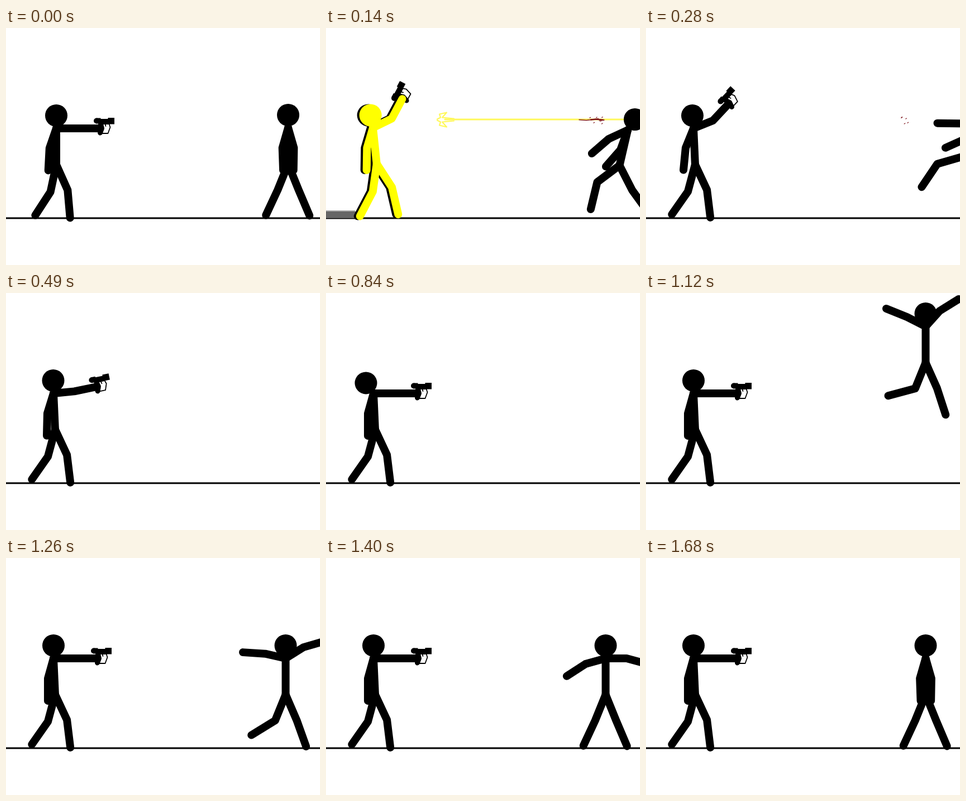
These frames come from a looping animation (562x425 px, 1.75 s). An HTML page with a canvas:

```html
<!DOCTYPE html>
<html lang="en">
<head>
<meta charset="utf-8">
<title>Stick duel</title>
<style>
  html, body { margin: 0; width: 100%; height: 100%; overflow: hidden; background: #fff; }
  canvas { display: block; }
</style>
</head>
<body>
<canvas id="stage" width="562" height="425"></canvas>
<script>
const ctx = document.getElementById('stage').getContext('2d');
const STEP = 70, STEPS = 25, FLOOR = 341;
const BLACK = '#000', YELLOW = '#ff0', BEAM = '#fff85a', BLOOD = '#7c1219';
const HEAD = 20, LIMB = 14, NECK = 23, SPINE = 65, ARM = [37.5, 40], LEG = [50, 50];

// A pose is the shoulder position plus bone angles in degrees: 0 hangs down, 90 points right.
const aim = { at: [85, 180], neck: [180], spine: [2.6],
  armL: [-15.5, 0], armR: [90, 90], legL: [-15, -35], legR: [25, 7] };
const ready = { ...aim, at: [90, 180], spine: [0], armL: [-19, -3], legL: [-12, -33], legR: [24, 5] };
const recoil = { at: [84, 179], neck: [191], spine: [6],
  armL: [-16.5, -1], armR: [116, 152], legL: [-8, -27.5], legR: [33, 13] };
const lower = { ...aim, neck: [185], armL: [-22, -5.6], armR: [112, 137] };
const lookUp = { ...aim, neck: [216] };

const rest = { at: [500.5, 180], neck: [180], spine: [0],
  armL: [-16, 2], armR: [16, -1], legL: [-22, -25], legR: [22, 23] };
const stand = { ...rest, at: [505, 179] };
const hit = { at: [540, 183], neck: [146], spine: [-13],
  armL: [-65, -49], armR: [-20, -41], legL: [-53, -13.5], legR: [27, 36] };
const flung = { at: [599, 172], neck: [140], spine: [-27],
  armL: [-91, -91], armR: [-45, -66], legL: [-74, -34], legR: [30, 40] };
const drop = { ...rest, armL: [-117, -112], armR: [138, 122], legL: [-22, -75], legR: [24, 18] };
const spread = { ...rest, armL: [-74.5, -57], armR: [90, 75] };

const shooterKeys = [[0, ready], [1, ready], [2, recoil], [4, lower], [8, aim],
  [9, aim], [12, lookUp], [16, aim]];
const flightKeys = [[0, stand], [2, hit], [4, flung]];
const fallKeys = [[17, drop], [20, spread], [24, rest]];

function mix(a, b, f) {
  const pose = {};
  for (const part in a) pose[part] = a[part].map((v, i) => v + (b[part][i] - v) * f);
  return pose;
}

function poseAt(keys, n) {
  const next = keys.findIndex(k => k[0] >= n);
  if (next < 0) return keys[keys.length - 1][1];
  if (next === 0) return keys[0][1];
  const [t0, a] = keys[next - 1], [t1, b] = keys[next];
  return mix(a, b, (n - t0) / (t1 - t0));
}

function targetPose(n) {
  const pose = poseAt(n < 7 ? flightKeys : fallKeys, n);
  const [x, y] = pose.at;
  const at = n < 7 ? [x + 70 * Math.max(0, n - 4), y] : [x, Math.min(y, 60 + 94 * (n - 16))];
  return { ...pose, at };
}

function random(seed) {
  return () => (seed = seed * 16807 % 2147483647) / 2147483647;
}

function line(points, color, width) {
  ctx.strokeStyle = color;
  ctx.lineWidth = width;
  ctx.beginPath();
  for (const [x, y] of points) ctx.lineTo(x, y);
  ctx.stroke();
}

function disc(x, y, r, color) {
  ctx.fillStyle = color;
  ctx.beginPath();
  ctx.arc(x, y, r, 0, Math.PI * 2);
  ctx.fill();
}

// Joint positions along bones of the given lengths and angles.
function chain(start, lengths, angles) {
  const points = [start];
  angles.forEach((deg, i) => {
    const [x, y] = points[i], a = deg * Math.PI / 180;
    points.push([x + lengths[i] * Math.sin(a), y + lengths[i] * Math.cos(a)]);
  });
  return points;
}

function figure(pose, color) {
  const [, head] = chain(pose.at, [NECK], pose.neck);
  const spine = chain(pose.at, [SPINE], pose.spine);
  disc(...head, HEAD, color);
  line(spine, color, LIMB);
  for (const arm of [pose.armL, pose.armR]) line(chain(pose.at, ARM, arm), color, LIMB);
  for (const leg of [pose.legL, pose.legR]) line(chain(spine[1], LEG, leg), color, LIMB);
}

function gun(pose) {
  const hand = chain(pose.at, ARM, pose.armR)[2];
  ctx.save();
  ctx.translate(...hand);
  ctx.rotate((90 - pose.armR[1]) * Math.PI / 180);
  disc(-5.5, -13.5, 5, BLACK);
  ctx.fillRect(-6, -18.5, 8, 10);
  ctx.fillRect(-2, -17, 20, 10);
  ctx.fillRect(15, -19, 11.5, 11.5);
  line([[2, -8], [4, 0], [1, 8]], BLACK, 9);
  line([[17, -8], [19, -2], [15, 9], [4, 9]], BLACK, 1.8);
  line([[10, -8], [11, -4]], BLACK, 1.8);
  ctx.restore();
}

function shot(width, size) {
  line([[213, 164], [534, 164]], BEAM, width);
  ctx.save();
  ctx.translate(198, 164.5);
  ctx.scale(size, size);
  const half = [[31, -2], [10, -4], [18, -13], [5, -10], [7, -4], [1, -1]];
  for (const side of [1, -1]) line(half.map(([x, y]) => [x, y * side]), BEAM, 2.2);
  ctx.restore();
}

function blood(n) {
  if (n < 2 || n > 4) return;
  const rnd = random(77), fresh = n === 2;
  if (fresh) {
    line([[453, 164.5], [466, 165.5], [482, 163.5], [498, 165]], BLOOD, 1.4);
    line([[474, 164.5], [484, 163.5], [496, 165]], BLOOD, 2.4);
  }
  for (let i = 0; i < (fresh ? 8 : 5); i++) {
    const x = 472 + 22 * rnd() - (n - 2) * (5 + 20 * rnd()), y = 159 + 13 * rnd();
    line([[x, y], [x + 1.5, y - 1]], BLOOD, 1.2);
  }
}

function draw(n) {
  ctx.fillStyle = '#fff';
  ctx.fillRect(0, 0, 562, 425);
  ctx.lineCap = ctx.lineJoin = 'round';
  line([[-5, FLOOR], [567, FLOOR]], BLACK, 2.8);

  const lit = n === 1 || n === 2, first = n === 1;
  if (lit) {
    ctx.fillStyle = '#aaa';
    ctx.fillRect(0, 327, 52, 2);
    ctx.fillStyle = '#666';
    ctx.fillRect(0, 329, 54, 12);
    shot(first ? 6 : 3.2, first ? 1.3 : 1);
  }
  figure(targetPose(n), BLACK);
  blood(n);

  const shooter = poseAt(shooterKeys, n);
  if (lit) {
    const [x, y] = shooter.at;
    figure({ ...shooter, at: [x - 4, y] }, BLACK);
  }
  gun(shooter);
  figure(shooter, lit ? YELLOW : BLACK);
}

function tick() {
  draw(Math.floor(performance.now() / STEP) % STEPS);
  requestAnimationFrame(tick);
}
tick();
</script>
</body>
</html>
```
